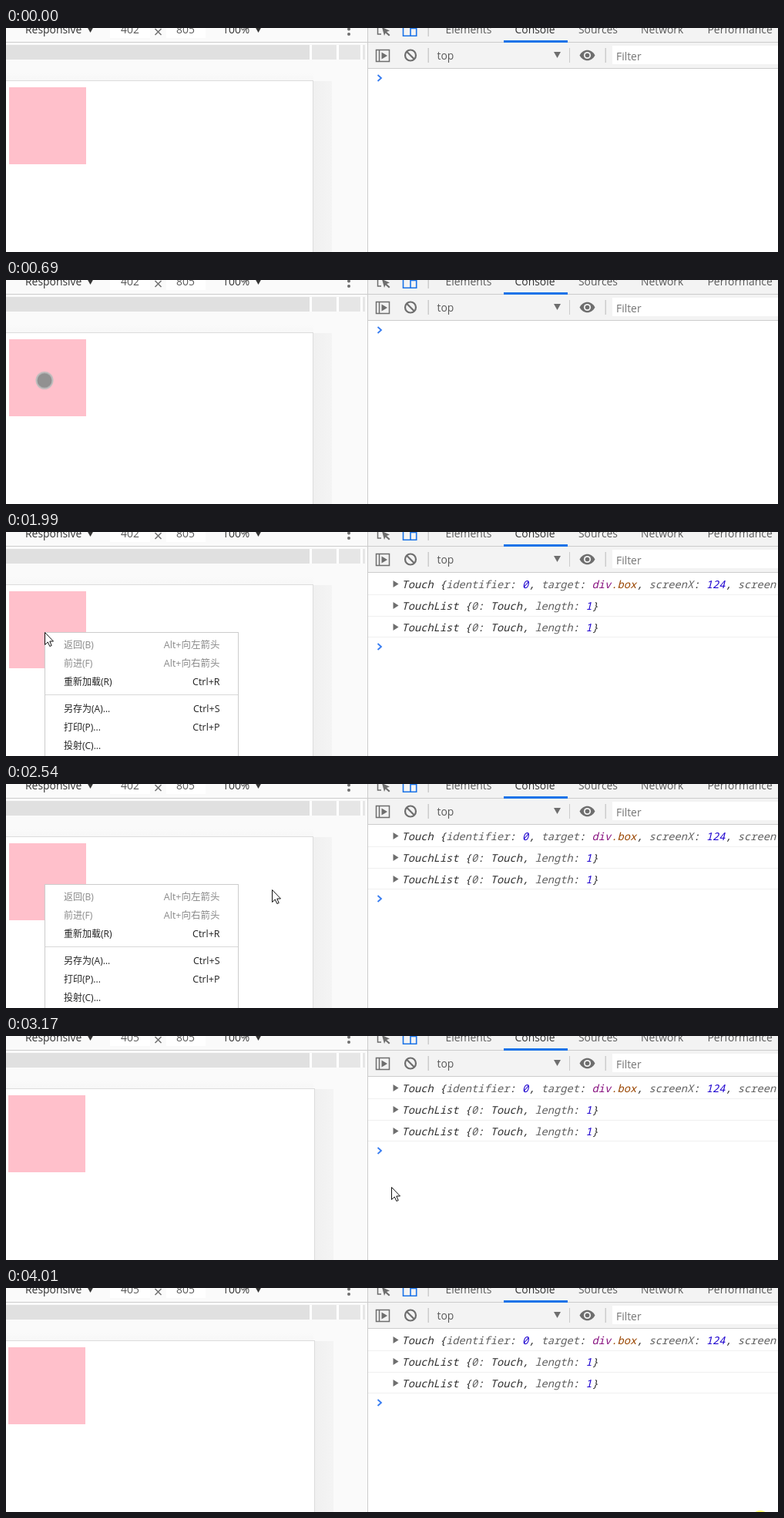
An HTML page that plays this animation: 1002 px wide and 291 px high, repeating every 4160 ms.

```html
<!DOCTYPE html>
<html lang="zh-CN">
<head>
<meta charset="utf-8">
<title>Touch events</title>
<style>
html, body { margin: 0; width: 100%; height: 100%; overflow: hidden; background: #fff; }
svg { display: block; width: 1002px; height: 291px; }
text { font: 13.9px "Open Sans", "Noto Sans", sans-serif; fill: #5a5a5a; }
.dark { fill: #333; }
.end { text-anchor: end; }
.icon { fill: none; stroke: #6e6e6e; stroke-width: 1.5; }
.solid { fill: #6e6e6e; }
.blue { fill: none; stroke: #1a73e8; stroke-width: 1.6; }
.rule { fill: #ccc; }
.row { fill: #f0f0f0; }
.log text { font: italic 13.72px "Noto Sans Mono", "DejaVu Sans Mono", monospace; fill: #303030; }
.log .key { fill: #5f5f5f; }
.log .num { fill: #1c00cf; }
.log .tag { fill: #881280; }
.log .cls { fill: #994500; }
#menu text { font: 12px "Open Sans", "Noto Sans CJK SC", "Noto Sans CJK", sans-serif; fill: #222; }
#menu .end { font-size: 12.5px; }
#menu .off text { fill: #8a8a8a; }

/* every part jumps between poses on one shared clock */
.anim { animation: 4160ms step-end infinite; }
.hidden { visibility: hidden; }

#arrow { animation-name: arrow; }
@keyframes arrow {
  5.04% { visibility: visible; transform: translate(557px, 246px); }
  6.97% { visibility: hidden; }
  47.83% { visibility: visible; transform: translate(50px, 130px); }
  55.52% { visibility: visible; transform: translate(62px, 131px); }
  57.45% { visibility: visible; transform: translate(150px, 133px); }
  59.13% { visibility: visible; transform: translate(262px, 135px); }
  61.05% { visibility: visible; transform: translate(345px, 137px); }
  62.98% { visibility: visible; transform: translate(392px, 139px); }
  64.66% { visibility: visible; transform: translate(405px, 139px); }
  68.74% { visibility: hidden; }
  76.2% { visibility: visible; transform: translate(500px, 196px); }
  77.88% { visibility: visible; transform: translate(588px, 248px); }
  79.8% { visibility: visible; transform: translate(680px, 258px); }
  81.73% { visibility: visible; transform: translate(775px, 265px); }
  83.65% { visibility: visible; transform: translate(860px, 271px); }
  85.33% { visibility: visible; transform: translate(925px, 278px); }
  87.25% { visibility: visible; transform: translate(963px, 283px); }
  88.94% { visibility: visible; transform: translate(964px, 287px); }
  90.86% { visibility: hidden; }
}

#touch { animation-name: touch; fill: #919191; stroke: #bcbcbc; stroke-width: 2; }
@keyframes touch {
  6.97% { visibility: visible; transform: translate(372px, 213px); }
  8.89% { visibility: visible; transform: translate(225px, 178px); }
  10.81% { visibility: visible; transform: translate(132px, 155px); }
  12.5% { visibility: visible; transform: translate(84px, 140px); }
  14.42% { visibility: visible; transform: translate(60px, 133px); }
  16.58% { visibility: visible; transform: translate(50px, 130.5px); }
  18.02% { visibility: visible; transform: translate(50px, 130.5px); fill: #aba263; stroke: #d2c680; }
  21.87% { visibility: visible; transform: translate(50px, 130.5px); fill: #c2b13c; stroke: #e2cb55; }
  47.83% { visibility: hidden; }
}

#resize { animation-name: resize; }
@keyframes resize {
  68.74% { visibility: visible; transform: translate(405px, 139px); }
  70.67% { visibility: visible; transform: translate(407px, 139px); }
  76.2% { visibility: hidden; }
}

#grip { animation-name: grip; }
@keyframes grip { 68.74% { fill: #e5e5e5; } 76.2% { fill: url(#edge); } }

#page { animation-name: page; }
@keyframes page { 70.67% { transform: translateX(2px); } }

#box { animation-name: box; }
@keyframes box { 70.67% { transform: translateX(-1px); } }

#narrow { animation-name: narrow; }
@keyframes narrow { 70.67% { visibility: hidden; } }

#wide { animation-name: wide; }
@keyframes wide { 70.67% { visibility: visible; } }

#first { animation-name: first; }
@keyframes first { 19.95% { visibility: visible; } }

#second { animation-name: second; }
@keyframes second { 47.83% { visibility: visible; } }

#prompt { animation-name: prompt; }
@keyframes prompt {
  19.95% { transform: translateY(56px); }
  47.83% { transform: translateY(84px); }
}

#menu { animation-name: menu; }
@keyframes menu { 47.83% { visibility: visible; } 68.74% { visibility: hidden; } }

#click { animation-name: click; }
@keyframes click { 96.39% { visibility: visible; } }
</style>
</head>
<body>
<svg viewBox="0 0 1002 291">
  <defs>
    <linearGradient id="edge">
      <stop stop-color="#f0f0f0"/>
      <stop offset="1" stop-color="#f4f4f4"/>
    </linearGradient>
    <linearGradient id="shade" x2="0" y2="1">
      <stop stop-color="#fafafa"/>
      <stop offset="1" stop-color="#f7f7f7"/>
    </linearGradient>
    <path id="down" d="M0 0H9L4.5 8Z"/>
    <path id="open" d="M502.500 63L509.500 67.500L502.500 72Z" class="solid"/>
    <g id="list" class="log">
      <rect class="row" x="470" y="81" width="532" height="1"/>
      <use href="#open" y="28"/>
      <text x="513.500" y="101">TouchList {<tspan class="key">0</tspan>: Touch, <tspan class="key">length</tspan>: <tspan class="num">1</tspan>}</text>
    </g>
  </defs>

  <!-- device view -->
  <rect width="469" height="291" fill="#fafafa"/>
  <rect class="rule" y="18" width="469" height="1"/>
  <path d="M135 0H187V13H135ZM208 0H259V13H208Z" fill="#fff"/>
  <text class="dark" x="25" y="7">Responsive</text>
  <use href="#down" x="105" y="-2" fill="#333"/>
  <text id="narrow" class="anim" x="149" y="7">402</text>
  <text id="wide" class="anim hidden" x="149" y="7">405</text>
  <path class="icon" d="M193.500 1L201.500 9M201.500 1L193.500 9"/>
  <text x="221" y="7">805</text>
  <text class="dark" x="281" y="7">100%</text>
  <use href="#down" x="323" y="-2" fill="#333"/>
  <g class="solid">
    <circle cx="445" cy="1.500" r="2"/>
    <circle cx="445" cy="8" r="2"/>
  </g>
  <rect y="22" width="466" height="19" fill="#fff"/>
  <rect y="22" width="394" height="19" fill="#e0e0e0"/>
  <path d="M397 22H429V41H397ZM432 22H460V41H432ZM463 22H466V41H463Z" fill="#e6e6e6"/>
  <rect y="58" width="399" height="10" fill="url(#shade)"/>
  <g id="page" class="anim">
    <rect id="grip" class="anim" x="399" y="69" width="24" height="223" fill="url(#edge)"/>
    <rect x="-10" y="68" width="409" height="224" fill="#dcdcdc"/>
    <rect x="-10" y="69" width="408" height="223" fill="#fff"/>
  </g>
  <rect id="box" class="anim" x="4" y="77" width="100" height="100" fill="#ffc0cb"/>

  <!-- developer tools -->
  <rect x="469" width="533" height="291" fill="#fff"/>
  <g id="prompt" class="anim">
    <rect class="row" x="470" y="52" width="532" height="1"/>
    <path d="M482.500 61L487 65L482.500 69" fill="none" stroke="#367cf1" stroke-width="1.800"/>
  </g>
  <rect x="470" width="532" height="52" fill="#f3f3f3"/>
  <path class="rule" d="M469 0H470V291H469ZM470 18H1002V19H470ZM470 52H1002V53H470Z"/>
  <path class="rule" d="M547.500 0H549V11H547.500ZM547.500 26H549V45H547.500ZM731 26H732V45H731ZM777.500 26H779V45H777.500Z"/>
  <path class="icon" d="M482.500 -2V8H487"/>
  <path class="solid" d="M488 -1L498 3.500L494 5L498.500 9L497 10.500L492.500 6.500L491 10Z"/>
  <path class="blue" d="M515.500 -2V10.300H532.700V0.500H525V10.300"/>
  <text x="570.500" y="7">Elements</text>
  <text class="dark" x="660.500" y="7">Console</text>
  <text x="743" y="7">Sources</text>
  <text x="824" y="7">Network</text>
  <text x="910.500" y="7">Performance</text>
  <rect x="646" y="16" width="83" height="3" fill="#1a73e8"/>

  <path class="icon" d="M480.500 28.500H497.500V43.500H480.500ZM484.500 28.500V43.500"/>
  <path class="solid" d="M487.500 31.500L495 36L487.500 40.500Z"/>
  <g class="icon" style="stroke-width: 2.200">
    <circle cx="525" cy="35.500" r="7"/>
    <path d="M520 30.500L530 40.500"/>
  </g>
  <text x="559.500" y="41">top</text>
  <use href="#down" class="solid" x="711" y="31"/>
  <path class="solid" d="M744.500 35.500C749 26.500 760 26.500 764.500 35.500C760 44.500 749 44.500 744.500 35.500Z"/>
  <circle cx="754.500" cy="35.500" r="4.600" fill="#f3f3f3"/>
  <circle class="solid" cx="754.500" cy="35.500" r="2.800"/>
  <rect x="787" y="23" width="215" height="24" fill="#fff"/>
  <text x="792" y="42" style="fill: #757575">Filter</text>

  <g id="first" class="log anim hidden">
    <use href="#open"/>
    <text x="513.500" y="73">Touch {<tspan class="key">identifier</tspan>: <tspan class="num">0</tspan>, <tspan class="key">target</tspan>: <tspan class="tag">div</tspan><tspan class="cls">.box</tspan>, <tspan class="key">screenX</tspan>: <tspan class="num">124</tspan>, <tspan class="key">screenY</tspan></text>
    <use href="#list"/>
  </g>
  <use id="second" class="anim hidden" href="#list" y="28"/>

  <!-- context menu -->
  <g id="menu" class="anim hidden">
    <rect x="50.500" y="130.500" width="251" height="180" fill="#fff" stroke="#ccc"/>
    <g class="off">
      <text x="75" y="151">返回(B)</text><text class="end" x="277.500" y="151">Alt+向左箭头</text>
      <text x="75" y="175">前进(F)</text><text class="end" x="277.500" y="175">Alt+向右箭头</text>
    </g>
    <text x="75" y="199">重新加载(R)</text><text class="end" x="277.500" y="199">Ctrl+R</text>
    <rect x="51" y="211" width="250" height="1" fill="#d9d9d9"/>
    <text x="75" y="234">另存为(A)...</text><text class="end" x="277.500" y="234">Ctrl+S</text>
    <text x="75" y="258">打印(P)...</text><text class="end" x="277.500" y="258">Ctrl+P</text>
    <text x="75" y="282">投射(C)...</text>
  </g>

  <!-- pointers -->
  <circle id="touch" class="anim hidden" r="10.500"/>
  <g id="resize" class="anim hidden">
    <circle r="12" fill="#f1ef6c"/>
    <path d="M-11.500 0L-6 -5V-2H6V-5L11.500 0L6 5V2H-6V5Z" fill="#f6f488" stroke="#66652c"/>
  </g>
  <path id="arrow" class="anim hidden" d="M.5 .5V16.500L4.300 13L6.800 18.500L9.200 17.500L6.800 12H11.500Z" fill="#fff" stroke="#111"/>
  <circle id="click" class="anim hidden" cx="979" cy="301" r="12" fill="#ffff6e"/>
</svg>
</body>
</html>
```
